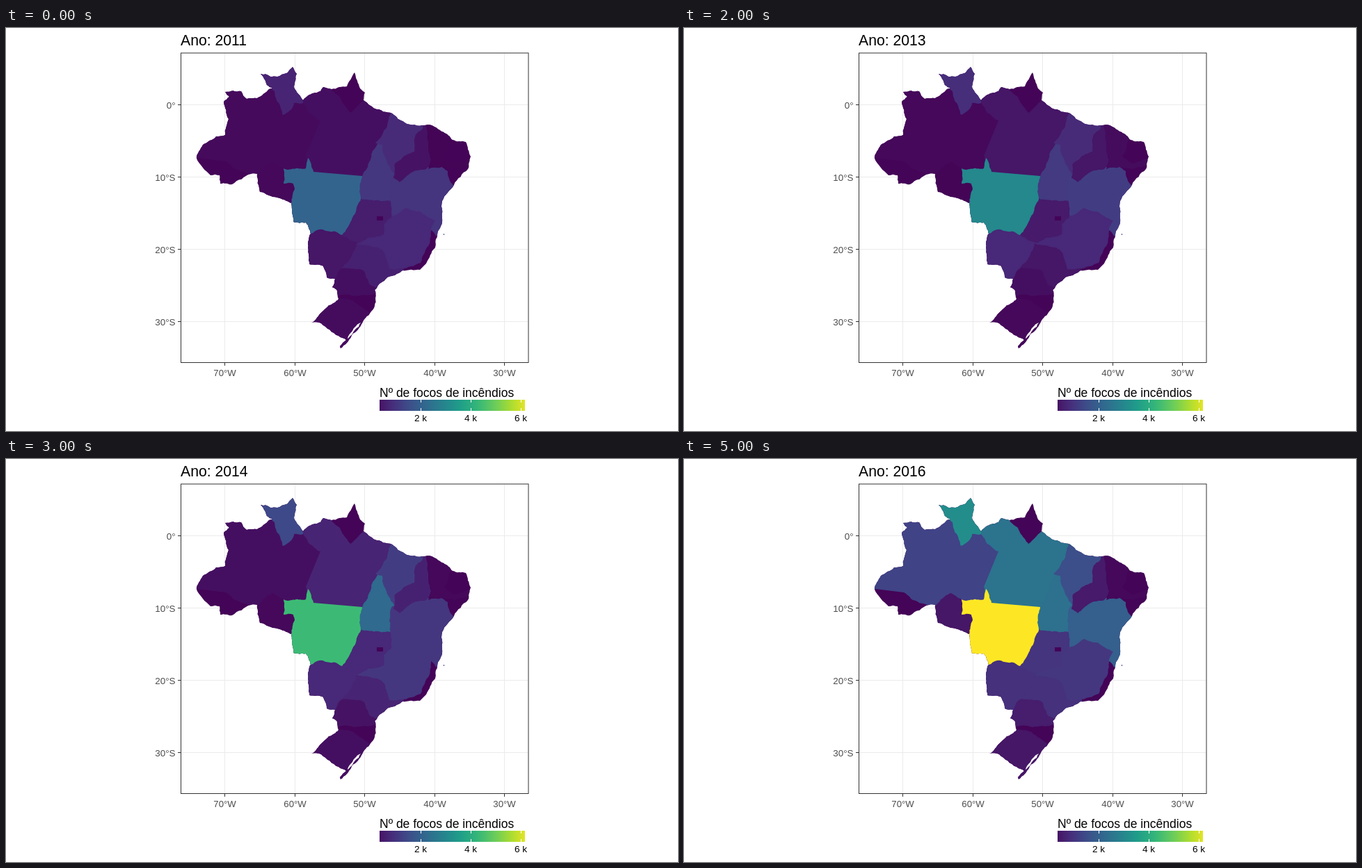
An HTML page with a canvas for the animation above (6 s loop, 966 px wide and 580 px high).

```html
<!DOCTYPE html>
<html lang="pt">
<head>
<meta charset="utf-8">
<title>Focos de incêndios</title>
<style>
html, body { margin: 0; width: 100%; height: 100%; overflow: hidden; background: #fff; }
canvas { display: block; }
</style>
</head>
<body>
<canvas id="stage" width="966" height="580"></canvas>
<script>
const ctx = document.getElementById('stage').getContext('2d');
const FONT = '"Liberation Sans", Arial, sans-serif';
const YEAR_MS = 1000, FIRST_YEAR = 2011, YEARS = 6;

const STOPS = ['440154', '482878', '3e4a89', '31688e', '26828e',
  '1f9e89', '35b779', '6dcd59', 'b4de2c', 'fde725']
  .map(h => [0, 2, 4].map(i => parseInt(h.slice(i, i + 2), 16)));

function viridis(t) {
  const p = t * (STOPS.length - 1);
  const i = Math.min(Math.floor(p), STOPS.length - 2);
  return `rgb(${STOPS[i].map((c, k) => Math.round(c + (STOPS[i + 1][k] - c) * (p - i)))})`;
}

let seed = 7;
function rand() {
  seed = (seed * 16807) % 2147483647;
  return seed / 2147483647;
}

// Long edges are surveyed lines and stay straight; short ones are broken up
// by midpoint displacement to look like rivers and coast.
function ragged(points) {
  const path = new Path2D();
  const pts = points.split(' ').map(p => p.split(',').map(Number));
  function edge(x, y, u, v) {
    const len = Math.hypot(u - x, v - y);
    if (len < 4 || len > 40) return path.lineTo(u, v);
    const off = (rand() - 0.5) * Math.min(len * 0.2, 3) / len;
    const mx = (x + u) / 2 - (v - y) * off, my = (y + v) / 2 + (u - x) * off;
    edge(x, y, mx, my);
    edge(mx, my, u, v);
  }
  path.moveTo(...pts[0]);
  pts.forEach((p, i) => edge(...p, ...pts[(i + 1) % pts.length]));
  return path;
}

const north = '366,66 380,70 390,70 405,64 412,56 418,66 414,85 427,104 436,96 452,91 456,85 468,88 490,84 501,64 509,87 516,93 514,104 530,116 555,123 573,136 602,140';
const east = '614,141 642,161 661,164 668,185 664,203 644,226 627,249 627,280 620,300 617,316 604,339 595,348 570,349 540,366 530,377 530,400';
const south = '517,417 504,436 490,453 481,461 480,458 489,449 478,443 453,425 439,424 464,399 478,390 476,378 469,373 473,361 461,359 455,342 436,340 434,316 438,296 431,280 413,279 410,252';
const west = '390,244 365,236 361,210 352,210 325,225 308,224 307,212 294,212 274,188 283,168 302,156 315,154 320,131 313,106 321,99 315,92 338,91 346,102 361,101 378,88 383,87 375,82 371,73';
const country = ragged([north, east, south, west].join(' '));
const lagoon = ragged('510,424 501,431 491,447 498,440 507,430');

// Scale level in percent per year, then inner borders. The country clips the
// outside, later states cover earlier ones, quiet states show the base colour.
const states = [
  ['4 11 6 10 19 38', '424,75 466,75 468,88 480,99 484,108 495,122 514,104 570,110 560,180 515,222 425,222 425,120'],
  ['2.5 1 2 4 4 20', '250,60 378,60 392,95 400,112 414,108 427,108 436,122 452,133 431,184 440,215 361,215 352,211 326,201 316,192 275,187 250,187'],
  ['2 1 1 2 2 6', '361,211 369,202 383,193 399,202 425,215 425,255 350,260'],
  ['10 9 13 22 20 49', '350,50 425,50 427,108 414,108 411,116 398,125 391,107 386,91 355,75'],
  ['6 13 11 11 12 14', '420,285 490,285 512,312 500,335 483,347 474,361 470,375 420,375'],
  ['3 5 2 4 9 6', '470,388 479,390 500,393 516,405 530,415 530,470 430,470 430,400'],
  ['9 5 6 10 7 14', '504,310 545,310 570,338 575,355 535,385 483,350 483,345 497,328'],
  ['4 3 4 5 8 8', '477,352 483,346 505,347 514,349 522,368 535,377 528,383 505,385 478,385 460,385 462,368 473,361'],
  ['8 6 7 11 9 15', '511,240 560,240 560,285 550,303 508,310 495,306 483,298 480,285 500,256'],
  ['16 24 17 34 30 37', '537,164 525,182 513,211 505,240 511,246 535,248 555,249 570,170'],
  ['12 23 12 18 24 24', '555,115 602,130 602,140 590,185 566,200 559,214 549,196 541,176 541,168 531,165 548,142'],
  ['15 29 18 16 19 30', '551,232 555,212 605,200 625,198 635,206 638,220 644,227 665,235 640,300 619,300 605,285 556,275 553,250'],
  ['5 20 6 9 7 7', '602,130 606,152 611,190 604,203 583,208 566,222 557,216 559,195 575,183 587,178 589,153 597,147'],
  ['1 5 3 2 3 2', '602,130 645,150 640,160 630,184 645,195 668,187 675,196 645,203 628,200 607,203 611,190 606,152'],
  ['11 13 11 16 9 16', '556,270 575,259 596,265 617,277 611,289 609,310 596,338 568,346 551,347 545,325 540,319 504,310 520,302 543,297 543,282'],
  ['32 49 47 68 72 100', '434,187 442,207 512,213 508,235 510,246 497,276 483,298 474,293 450,290 438,296 420,300 400,280 410,252 415,232 413,224 399,224 399,202 431,202']
].map(([levels, borders]) => ({
  colors: levels.split(' ').map(v => viridis(v / 100)),
  shape: ragged(borders)
}));

function rect(x, y, w, h, color) {
  ctx.fillStyle = color;
  ctx.fillRect(x, y, w, h);
}

function fill(shape, color) {
  ctx.fillStyle = color;
  ctx.fill(shape);
}

function label(str, x, y, size, color, align) {
  ctx.font = `${size}px ${FONT}`;
  ctx.fillStyle = color;
  ctx.textAlign = align;
  ctx.fillText(str, x, y);
}

function drawAxes() {
  for (let i = 0; i < 5; i++) {
    const x = Math.round(314 + i * 100.6);
    rect(x, 36, 1, 445, '#ebebeb');
    rect(x, 482, 1, 4, '#333');
    label(`${70 - i * 10}°W`, x + 0.5, 501, 13.2, '#4d4d4d', 'center');
  }
  for (let i = 0; i < 4; i++) {
    const y = 110 + i * 104;
    rect(252, y, 499, 1, '#ebebeb');
    rect(247, y, 4, 1, '#333');
    label(i ? `${i * 10}°S` : '0°', 243.5, y + 5.5, 13.4, '#4d4d4d', 'right');
  }
  ctx.strokeStyle = '#333';
  ctx.strokeRect(251.5, 36, 499.5, 445.5);
}

function drawMap(year) {
  const base = viridis(0.008);
  fill(country, base);
  ctx.save();
  ctx.clip(country);
  for (const s of states) fill(s.shape, s.colors[year]);
  ctx.restore();
  rect(533, 271, 9, 6, base);
  fill(lagoon, '#fff');
  rect(629, 296, 1, 2, viridis(0.2));
}

function drawLegend() {
  label('Nº de focos de incêndios', 537, 530.5, 17.5, '#000', 'left');
  const bar = ctx.createLinearGradient(537, 0, 746, 0);
  for (let i = 0; i <= 20; i++) bar.addColorStop(i / 20, viridis(0.05 + 0.91 * i / 20));
  rect(537, 535, 209, 16, bar);
  for (let k = 2; k <= 6; k += 2) {
    const x = 524 + k * 36;
    rect(x, 535, 1, 4, '#fff');
    rect(x, 547, 1, 4, '#fff');
    label(`${k} k`, x, 566, 13.6, '#000', 'center');
  }
}

function draw(now) {
  const year = Math.floor(now / YEAR_MS) % YEARS;
  rect(0, 0, 966, 580, '#fff');
  label(`Ano: ${FIRST_YEAR + year}`, 251, 25, 21.2, '#000', 'left');
  drawAxes();
  drawMap(year);
  drawLegend();
}

function tick() {
  draw(performance.now());
  requestAnimationFrame(tick);
}
tick();
</script>
</body>
</html>
```
